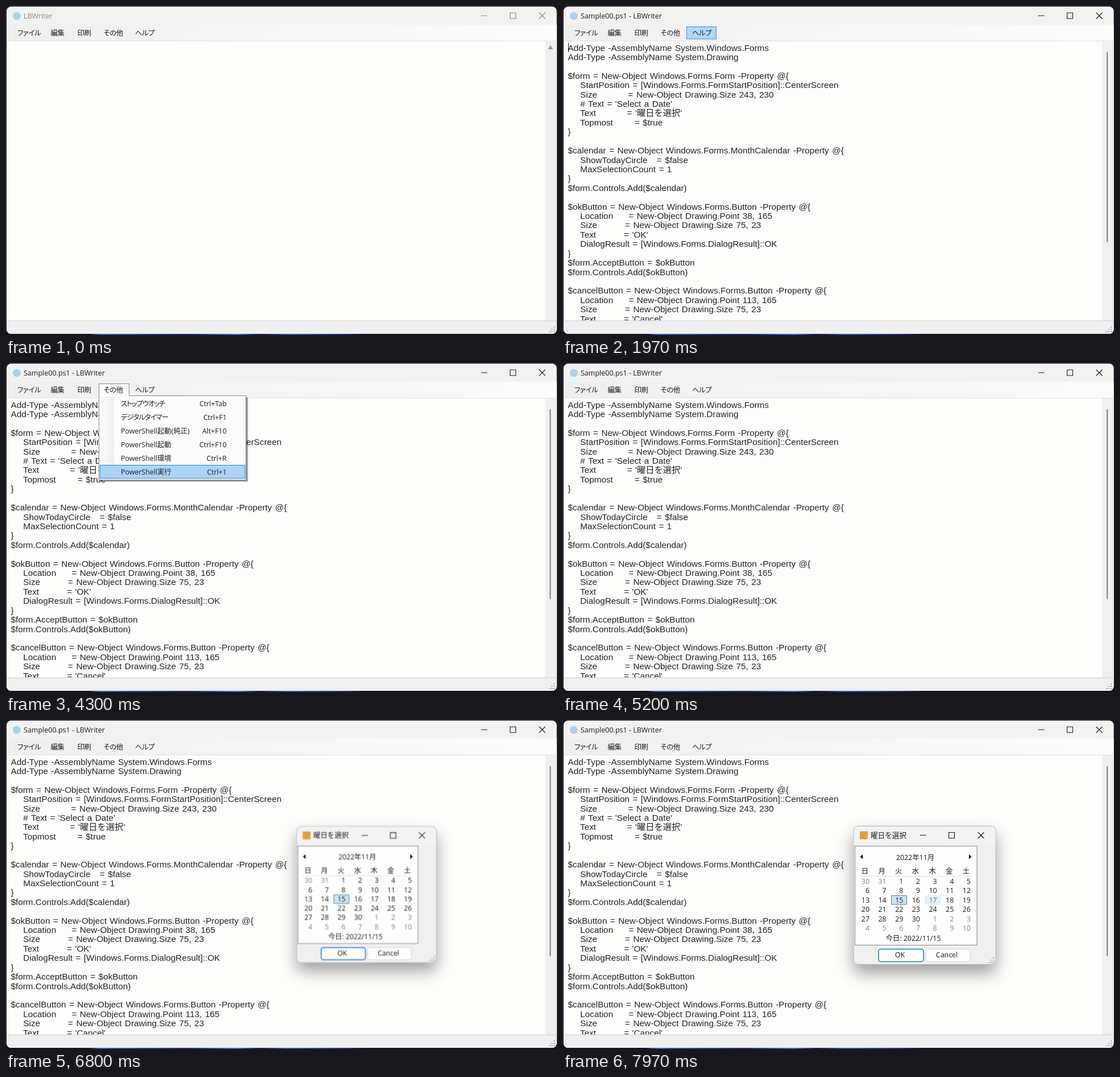
An HTML page for the animation above (8 s loop, 969 by 578 pixels).

```html
<!DOCTYPE html>
<html lang="ja">
<head>
<meta charset="utf-8">
<title>LBWriter</title>
<style>
html, body { margin: 0; width: 100%; height: 100%; overflow: hidden; background: #10131f; }
svg { display: block; width: 969px; height: 578px; }
text { white-space: pre; font: 12.4px "Open Sans", "Noto Sans CJK JP", sans-serif; fill: #1c1c1c; }
.code text { font: 15.3px "Liberation Sans", "Noto Sans CJK JP", sans-serif; word-spacing: 1.2px; fill: #242424; }
.kana { font-feature-settings: "palt"; letter-spacing: -.4px; }
.icon { fill: none; stroke: #161616; stroke-width: 1.1; }
.idle { opacity: .5; }
#dialog { transform-origin: 511px 220px; }
</style>
</head>
<body>
<svg id="stage" viewBox="0 0 969 578">
  <defs>
    <linearGradient id="desk">
      <stop offset=".15" stop-color="#10131f"/><stop offset=".17" stop-color="#3b56b4"/>
      <stop offset=".33" stop-color="#1d2a6b"/><stop offset=".42" stop-color="#4467d2"/>
      <stop offset=".46" stop-color="#151b3f"/><stop offset=".51" stop-color="#3b50b0"/>
      <stop offset=".62" stop-color="#202b70"/><stop offset=".65" stop-color="#10131f"/>
    </linearGradient>
    <linearGradient id="strip"><stop stop-color="#efefef"/><stop offset="1" stop-color="#fcfcfc"/></linearGradient>
    <linearGradient id="gutter"><stop stop-color="#fbfbfb"/><stop offset="1" stop-color="#eeeeee"/></linearGradient>
    <clipPath id="frame"><rect x="1" y="1" width="967.5" height="575" rx="8"/></clipPath>
    <clipPath id="page"><rect x="2" y="62" width="946" height="490.5"/></clipPath>
    <filter id="soft" x="-30%" y="-30%" width="160%" height="170%">
      <feDropShadow dx="0" dy="15" stdDeviation="14" flood-opacity=".36"/>
    </filter>
  </defs>
</svg>
<script>
const LOOP = 8000;
const OPENED = 800, HELP_ON = 1700, MENU_ON = 2400, MENU_OFF = 4750, DIALOG_ON = 6670;
const stage = document.getElementById('stage');

function add(parent, tag, attrs = {}, content = '') {
  const el = document.createElementNS('http://www.w3.org/2000/svg', tag);
  for (const [name, value] of Object.entries(attrs)) el.setAttribute(name, value);
  el.textContent = content;
  return parent.appendChild(el);
}
const group = (parent, attrs) => add(parent, 'g', attrs);
const box = (parent, x, y, width, height, fill, more = {}) =>
  add(parent, 'rect', { x, y, width, height, fill, ...more });
const path = (parent, d, more) => add(parent, 'path', { d, ...more });
const label = (parent, x, y, content, more) => add(parent, 'text', { x, y, ...more }, content);

// Plays [ms, value] steps of one property over the loop.
function timeline(el, prop, steps, easing = 'step-end') {
  const frames = steps.map(([ms, value]) => ({ offset: ms / LOOP, [prop]: value, easing }));
  frames.push({ offset: 1, [prop]: steps.at(-1)[1] });
  el.animate(frames, { duration: LOOP, iterations: Infinity });
}
function showBetween(el, on, off = LOOP) {
  const steps = [[0, on ? 'hidden' : 'visible']];
  if (on) steps.push([on, 'visible']);
  if (off < LOOP) steps.push([off, 'hidden']);
  timeline(el, 'visibility', steps);
}
function windowButtons(parent, xs, y) {
  const [min, max, close] = xs;
  return path(parent, `M${min - 5.5} ${y}h11 M${max - 5} ${y - 5}h10v10h-10z
    M${close - 5.5} ${y - 5.5}l11 11m0-11l-11 11`, { class: 'icon' });
}
function grip(parent, x, y) {
  for (let row = 0; row < 3; row++)
    for (let col = 0; col <= row; col++)
      box(parent, x - col * 4, y - (2 - row) * 4, 2, 2, '#a6a6a6');
}

// Desktop and editor window
box(stage, 0, 0, 969, 578, '#10131f');
box(stage, 0, 575, 969, 3, 'url(#desk)');
const main = group(stage, { 'clip-path': 'url(#frame)' });
box(main, 0, 0, 969, 578, '#f2f3f1');
box(main, 0, 33, 969, 28, 'url(#strip)');
box(main, 0, 61, 969, 492, '#fdfdfb');
box(main, 0, 61, 969, 1, '#e3e3e3');
box(main, 948.5, 62, 20, 491, '#f0f0f0');
box(main, 0, 553, 969, 24, '#f0f0f0');
box(main, 0, 552.5, 969, 1, '#d0d0cc');
grip(main, 963, 571);
add(main, 'circle', { cx: 19, cy: 17.5, r: 7, fill: '#a9d3ea' });

const idle = group(main, { class: 'idle' });
label(idle, 31, 22, 'LBWriter', { style: 'font-size:12.5px' });
windowButtons(idle, [841, 891.5, 943], 17);
path(idle, 'M953 76l4.5-7l4.5 7z', { fill: '#444' });
showBetween(idle, 0, OPENED);

const active = group(main);
label(active, 31, 22, 'Sample00.ps1 - LBWriter', { style: 'font-size:12.5px' });
windowButtons(active, [841, 891.5, 943], 17);
box(active, 956, 81, 2.2, 334, '#858585', { rx: 1 });
showBetween(active, OPENED);

const source = `Add-Type -AssemblyName System.Windows.Forms
Add-Type -AssemblyName System.Drawing

$form = New-Object Windows.Forms.Form -Property @{
    StartPosition = [Windows.Forms.FormStartPosition]::CenterScreen
    Size          = New-Object Drawing.Size 243, 230
    # Text = 'Select a Date'
    Text          = '曜日を選択'
    Topmost       = $true
}

$calendar = New-Object Windows.Forms.MonthCalendar -Property @{
    ShowTodayCircle   = $false
    MaxSelectionCount = 1
}
$form.Controls.Add($calendar)

$okButton = New-Object Windows.Forms.Button -Property @{
    Location     = New-Object Drawing.Point 38, 165
    Size         = New-Object Drawing.Size 75, 23
    Text         = 'OK'
    DialogResult = [Windows.Forms.DialogResult]::OK
}
$form.AcceptButton = $okButton
$form.Controls.Add($okButton)

$cancelButton = New-Object Windows.Forms.Button -Property @{
    Location     = New-Object Drawing.Point 113, 165
    Size         = New-Object Drawing.Size 75, 23
    Text         = 'Cancel'`;
const code = group(main, { class: 'code', 'clip-path': 'url(#page)' });
source.split('\n').forEach((line, i) => label(code, 8.5, 78.5 + i * 16.42, line));
showBetween(code, OPENED);

const caret = box(main, 9, 65, 1, 16, '#111');
timeline(caret, 'visibility', [[0, 'hidden'], [OPENED, 'visible'], [1330, 'hidden'],
  [1860, 'visible'], [2390, 'hidden']]);

// Menu bar
const hover = { stroke: '#3c92da', 'stroke-width': 1 };
showBetween(box(main, 217.5, 36.5, 52, 21.5, '#b3d7f3', hover), HELP_ON, 2250);
showBetween(box(main, 163.5, 36.5, 53, 21.5, '#b3d7f3', hover), 2250, MENU_ON);

// Drop-down
const menu = group(stage);
box(menu, 167, 61, 259, 148, '#000', { opacity: .18 });
box(menu, 166, 60, 258.5, 147.5, '#000', { opacity: .35 });
path(menu, 'M163.5 36.5h53v21h205.5v148h-258.5z', { fill: '#fcfcfc', stroke: '#858585' });
box(menu, 165, 59, 25, 145, 'url(#gutter)');
const bar = box(menu, 165.5, 59.5, 254.5, 23, '#acd4f5', { stroke: '#2484d8' });
timeline(bar, 'transform', [[0, 0], [2620, 24], [2740, 48], [2860, 72], [3350, 96], [3550, 120]]
  .map(([ms, y]) => [ms, `translateY(${y}px)`]));
showBetween(bar, 2500, MENU_OFF);
const items = [['ストップウオッチ', 'Ctrl+Tab'], ['デジタルタイマー', 'Ctrl+F1'],
  ['PowerShell起動(純正)', 'Alt+F10'], ['PowerShell起動', 'Ctrl+F10'],
  ['PowerShell環境', 'Ctrl+R'], ['PowerShell実行', 'Ctrl+1']];
items.forEach(([name, key], i) => {
  const y = 75.5 + i * 24;
  label(menu, 202, y, name, i < 2 ? { class: 'kana', style: 'letter-spacing:-1px' } : {});
  label(menu, 388, y, key, { 'text-anchor': 'end' });
});
showBetween(menu, MENU_ON, MENU_OFF);

[[20, 'ファイル'], [78.5, '編集'], [125.5, '印刷'], [171.5, 'その他'], [227, 'ヘルプ']]
  .forEach(([x, name]) => label(stage, x, 51.5, name, { class: 'kana' }));

// Calendar dialog
const dialog = group(stage, { id: 'dialog' });
box(dialog, 511, 186.5, 250, 243, '#f0f0f0', { rx: 8, stroke: '#aeb0b4', filter: 'url(#soft)' });
path(dialog, 'M511.5 219v-24a8 8 0 0 1 8-8h233a8 8 0 0 1 8 8v24z', { fill: '#f3f3f6' });
box(dialog, 522, 195.5, 14, 14, '#e2a03c');
label(dialog, 541, 207, '曜日を選択', { style: 'font-size:12.6px' });
windowButtons(dialog, [633, 683.5, 735], 202.5);
box(dialog, 513.5, 221.5, 214.5, 174, '#fefefe', { stroke: '#868686' });
path(dialog, 'M527 236v8.5l-4.5-4.25z M714 236v8.5l4.5-4.25z', { fill: '#111' });
const middle = { 'text-anchor': 'middle' };
label(dialog, 619.5, 245.5, '2022年11月', middle);
box(dialog, 521, 274, 200, 1, '#e2e2e2');
box(dialog, 577.5, 308.5, 27, 15.5, '#cce4f7', { stroke: '#26507a', 'stroke-dasharray': '1.5 .5' });

const columnX = i => 531 + i * 29.65;
[...'日月火水木金土'].forEach((day, i) => label(dialog, columnX(i), 270, day, middle));
const digits = { 'text-anchor': 'end' };
const rowY = row => 287.5 + row * 16.5;
for (let cell = 0; cell < 42; cell++) {
  const day = cell - 1;
  const shown = day < 1 ? day + 31 : day > 30 ? day - 30 : day;
  const fill = shown === day ? '' : 'fill:#858585';
  label(dialog, columnX(cell % 7) + 8, rowY(Math.floor(cell / 7)), shown, { ...digits, style: fill });
}
const hovered = group(dialog);
box(hovered, 636, 308, 28.5, 16.5, '#e5f2fc');
label(hovered, columnX(4) + 8, rowY(2), '17', { ...digits, style: 'fill:#3272ad' });
label(dialog, 616, 387.5, '今日: 2022/11/15', middle);
box(dialog, 555, 402.5, 79, 22, '#fdfdfd', { rx: 4, stroke: '#1a78c2', 'stroke-width': 1.5 });
box(dialog, 637.5, 402.5, 78.5, 22, '#fdfdfd', { rx: 4, stroke: '#d3d3d3' });
label(dialog, 592.5, 417, 'OK', middle);
label(dialog, 675, 417, 'Cancel', middle);
grip(dialog, 756, 425);

timeline(dialog, 'opacity', [[0, 0], [DIALOG_ON, 0], [6770, 1]], 'linear');
timeline(dialog, 'transform', [[0, 'scale(.93)'], [DIALOG_ON, 'scale(.93)'],
  [6800, 'scale(.984)'], [6900, 'scale(1)']], 'linear');
timeline(hovered, 'opacity', [[0, 0], [7650, 1]]);
</script>
</body>
</html>
```
